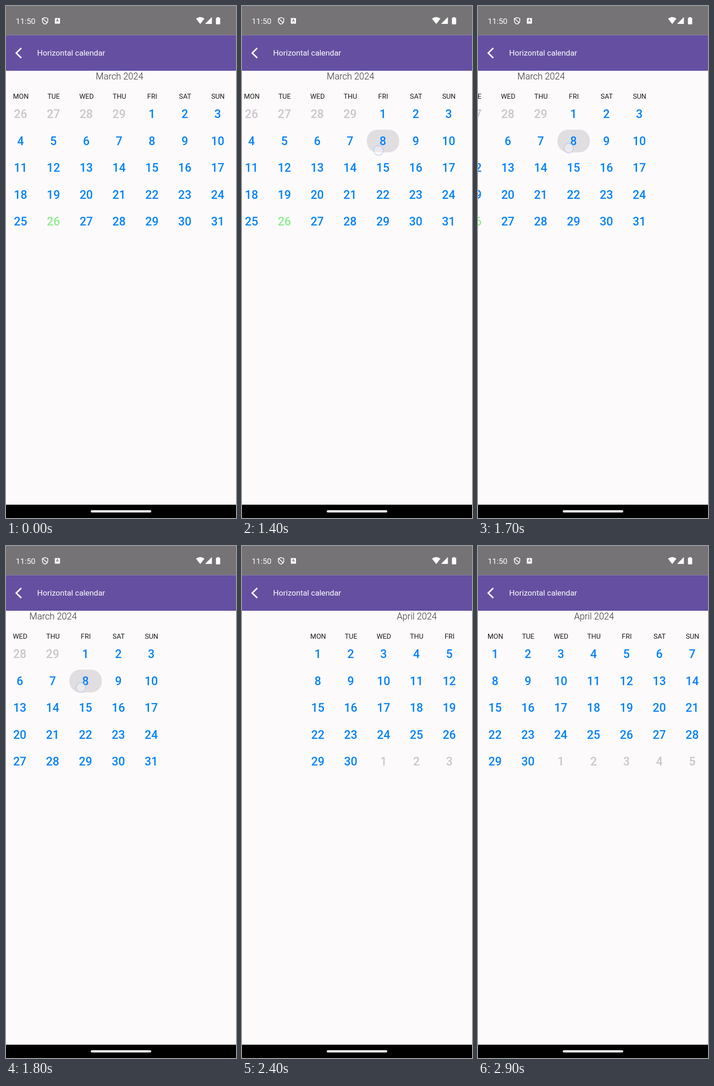
These frames come from a looping animation (502 by 1115 pixels, 3 s). An HTML page:

```html
<!DOCTYPE html>
<html lang="en">
<head>
<meta charset="utf-8">
<title>Horizontal calendar</title>
<style>
html, body { margin: 0; width: 100%; height: 100%; overflow: hidden; background: #fdfafc; }
svg { display: block; width: 100vw; height: 100vh; font-family: Roboto, Inter, sans-serif; }
.white { fill: #fff; }
.title { font-size: 19.7px; font-weight: 300; fill: #333; text-anchor: middle; }
.week { font-size: 15px; fill: #1c1c1c; text-anchor: middle; }
.day { font-size: 25.5px; font-weight: 500; fill: #0482f6; text-anchor: middle; }
.other { fill: #c9c7c9; }
.today { fill: #8aee8c; }
#march, #april, #press, #touch { animation: 3s step-end infinite; }
#march { animation-name: march; }
#april { animation-name: april; }
#press { animation-name: press; }
#touch { animation-name: touch; }

@keyframes march {
  0% { transform: translateX(0); visibility: visible; }
  46.66% { transform: translateX(-11px); }
  50% { transform: translateX(-42px); }
  53.33% { transform: translateX(-74.5px); }
  56.66% { transform: translateX(-110px); }
  60% { transform: translateX(-145px); }
  63.33% { transform: translateX(-180px); }
  66.66% { transform: translateX(-215px); }
  70% { transform: translateX(-250px); }
  73.33% { transform: translateX(-285px); }
  76.66% { transform: translateX(-320px); }
  80%, 100% { transform: translateX(-368px); visibility: hidden; }
}
@keyframes april {
  0% { transform: translateX(128.3px); visibility: hidden; }
  80% { transform: translateX(128.3px); visibility: visible; }
  83.33% { transform: translateX(45px); visibility: visible; }
  86.66% { transform: translateX(5.5px); visibility: visible; }
  90% { transform: translateX(1px); visibility: visible; }
  93.33%, 100% { transform: translateX(0); visibility: visible; }
}
@keyframes press {
  0% { opacity: 0; }
  46.66% { opacity: 1; }
  76.66%, 100% { opacity: 0; }
}
@keyframes touch {
  0% { transform: translate(329px, 317px); opacity: 0; }
  40% { transform: translate(329px, 317px); opacity: 1; }
  43.33% { transform: translate(321px, 316px); opacity: 1; }
  46.66% { transform: translate(298px, 314.5px); opacity: 1; }
  50% { transform: translate(267px, 312px); opacity: 1; }
  53.33% { transform: translate(232.7px, 310.5px); opacity: 1; }
  56.66% { transform: translate(198px, 309.5px); opacity: 1; }
  60% { transform: translate(163.5px, 308.5px); opacity: 1; }
  63.33% { transform: translate(129px, 308px); opacity: 1; }
  66.66% { transform: translate(94px, 308px); opacity: 1; }
  70% { transform: translate(59px, 308px); opacity: 1; }
  73.33% { transform: translate(24px, 308px); opacity: 1; }
  76.66%, 100% { transform: translate(-11px, 308px); opacity: 0; }
}
</style>
</head>
<body>
<svg viewBox="0 0 502 1115" preserveAspectRatio="none">
  <rect width="502" height="1115" fill="#fdfafc"/>

  <g id="march">
    <rect id="press" x="283.5" y="269.2" width="70.5" height="49.6" rx="23" fill="#e0dee0"/>
  </g>
  <g id="april"></g>
  <circle id="touch" r="10.4" fill="#fff" fill-opacity=".35" stroke="#b4c2ec" stroke-width="1.2"/>

  <!-- status bar -->
  <rect width="502" height="63.5" fill="#757375"/>
  <text class="white" x="21.3" y="38.6" font-size="17.3">11:50</text>
  <g fill="none" stroke="#fff" stroke-width="1.7">
    <path d="M85.3 25.2 L91.2 27.3 V32 C91.2 35.6 88.8 38.3 85.3 39.5 C81.8 38.3 79.4 35.6 79.4 32 V27.3 Z"/>
    <path d="M80.2 27.6 L90 36.6"/>
  </g>
  <rect class="white" x="106.6" y="26.2" width="11.2" height="12.4" rx="1"/>
  <path d="M109.8 34 L112.2 28.4 L114.6 34 M110.6 32.3 H113.8" fill="none" stroke="#757375" stroke-width="1.2"/>
  <path class="white" d="M414.6 27.6 Q424 20.2 433.2 27.6 L423.9 39.2 Z M449.4 24 V39 H434.4 Z"/>
  <path class="white" d="M461 24.2 H464.6 V25.6 H466.4 Q467.5 25.6 467.5 26.7 V38.8 Q467.5 39.9 466.4 39.9 H459.3 Q458.2 39.9 458.2 38.8 V26.7 Q458.2 25.6 459.3 25.6 H461 Z"/>

  <!-- app bar -->
  <rect y="63.5" width="502" height="77.5" fill="#654fa1"/>
  <path d="M33.3 91.6 L22.3 102.4 L33.3 113.2" fill="none" stroke="#fff" stroke-width="3.2"/>
  <text class="white" x="68" y="108" font-size="17.1">Horizontal calendar</text>

  <!-- navigation bar -->
  <rect y="1086" width="502" height="29" fill="#000"/>
  <rect x="185" y="1097.9" width="132" height="5" rx="2.5" fill="#f4f2f4"/>
</svg>
<script>
const WEEK = ["MON", "TUE", "WED", "THU", "FRI", "SAT", "SUN"];

function label(parent, cls, x, y, str) {
  const el = document.createElementNS("http://www.w3.org/2000/svg", "text");
  el.setAttribute("class", cls);
  el.setAttribute("x", x);
  el.setAttribute("y", y);
  el.textContent = str;
  parent.appendChild(el);
}

// lead: days shown from the month before; prev: length of that month
function month(id, name, left, { lead, prev, days, today }) {
  const page = document.getElementById(id);
  const col = i => left + 71.72 * i;
  label(page, "title", col(3) + 1, 159.5, name);
  WEEK.forEach((w, i) => label(page, "week", col(i) + 0.6, 202.4, w));
  for (let i = 0; i < 35; i++) {
    const n = i - lead + 1;
    const inside = n >= 1 && n <= days;
    const num = n < 1 ? prev + n : n > days ? n - days : n;
    const cls = !inside ? "day other" : n === today ? "day today" : "day";
    label(page, cls, col(i % 7), 244 + 58.5 * Math.floor(i / 7), num);
  }
}

month("march", "March 2024", 31.7, { lead: 4, prev: 29, days: 31, today: 26 });
month("april", "April 2024", 37.2, { lead: 0, prev: 31, days: 30 });
</script>
</body>
</html>
```
